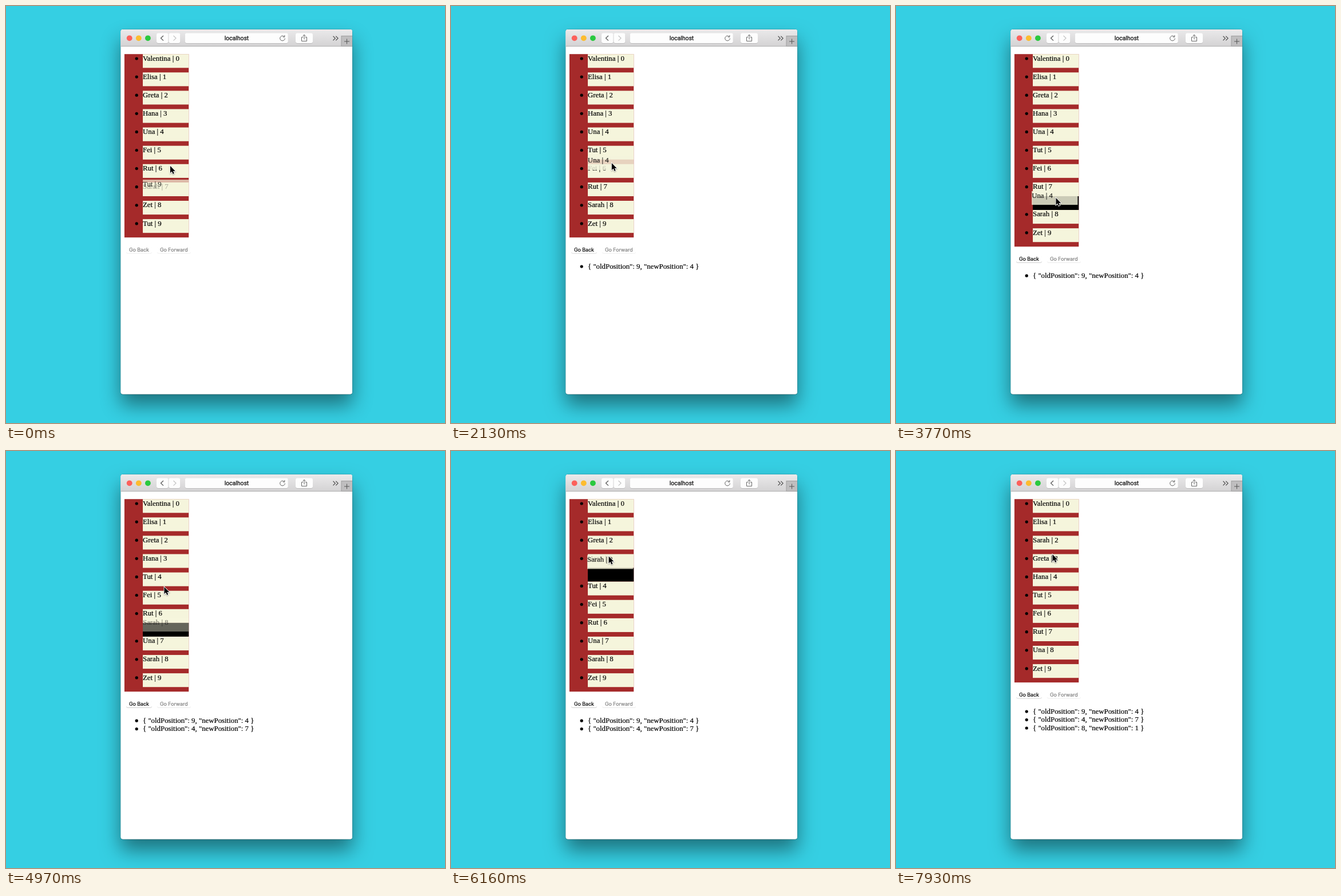
An HTML page with a canvas for the animation above (8000 ms loop, 767 by 730 pixels).

```html
<!DOCTYPE html>
<html lang="en">
<head>
<meta charset="utf-8">
<title>Sortable list</title>
<style>
  html, body { margin: 0; width: 100%; height: 100%; overflow: hidden; background: #35cfe3; }
  canvas { display: block; }
</style>
</head>
<body>
<canvas id="stage" width="767" height="730"></canvas>
<script>
const ctx = document.getElementById('stage').getContext('2d');
const LOOP = 8000, TICK = 148.9, DELAY = 32;
const ZOOM = 0.8025;
const LEFT = 206.92, TOP = 84.2, INDENT = LEFT + 40 * ZOOM;
const ROW = 40 * ZOOM, BOX = 30 * ZOOM, WIDTH = 100 * ZOOM, GROW = 20 * ZOOM;
const SERIF = `${16 * ZOOM}px "Liberation Serif", "Times New Roman", serif`;
const SMALL = `${11 * ZOOM}px Inter, sans-serif`;
const BROWN = '#a52a2a', BEIGE = '#f5f5dc';

const names = ['Valentina', 'Elisa', 'Greta', 'Hana', 'Una', 'Fei', 'Rut', 'Sarah', 'Zet', 'Tut'];

// Each drag takes row `from` to the gap below row `to`; times are in ticks.
// The pointer eases from start to end, then glides to rest during `glide`.
// The dragged copy starts `lag` pixels behind the pointer and catches up.
const drags = [
  { grab: 0, drop: 8, from: 9, to: 4, curve: 0, lag: 36,
    start: [287, 280], end: [282, 236], rest: [282, 224], glide: [8, 10] },
  { grab: 13, drop: 26, from: 4, to: 7, curve: 2.75, lag: 0,
    start: [282, 224], end: [279.5, 336], rest: [276.5, 354], glide: [28, 29] },
  { grab: 33, drop: 49, from: 8, to: 1, curve: -3.4, lag: 66,
    start: [276.5, 238], end: [275, 143], rest: [273.5, 181], glide: [50, 53] }
];

const clamp = u => Math.min(1, Math.max(0, u));
const mix = (a, b, u) => a.map((v, i) => v + (b[i] - v) * u);

// Ease-out; a positive curve overshoots, a negative one starts slowly.
function ease(u, curve) {
  const v = u - 1;
  return 1 + (curve + 1) * v ** 3 + curve * v ** 2;
}

function pointerAt(d, k) {
  if (k >= d.drop) return mix(d.end, d.rest, clamp((k - d.glide[0]) / (d.glide[1] - d.glide[0])));
  return mix(d.start, d.end, ease(clamp((k - d.grab) / (d.drop - d.grab - 2)), d.curve));
}

const lagAt = (d, k) => d.lag * 0.79 ** Math.max(0, k - d.grab);
const copyTop = (d, k) => pointerAt(d, k)[1] - 12 + lagAt(d, k);

// Hovering reacts one tick late.
function openGap(d, k) {
  const y = copyTop(d, k - 1) + 11.5 - TOP;
  const row = Math.floor(y / ROW);
  return y - row * ROW >= BOX ? row : -1;
}

function rect(x, y, w, h, fill) {
  ctx.fillStyle = fill;
  ctx.fillRect(x, y, w, h);
}

function round(x, y, w, h, r, fill) {
  ctx.fillStyle = fill;
  ctx.beginPath();
  ctx.roundRect(x, y, w, h, r);
  ctx.fill();
}

function dot(x, y, r, fill = '#000') {
  ctx.fillStyle = fill;
  ctx.beginPath();
  ctx.arc(x, y, r, 0, 7);
  ctx.fill();
}

function text(s, x, y, font = SERIF, fill = '#000') {
  ctx.font = font;
  ctx.fillStyle = ctx.strokeStyle = fill;
  ctx.lineWidth = 0.2;
  ctx.fillText(s, x, y);
  ctx.strokeText(s, x, y);
}

function line(path, color, width = 1) {
  ctx.strokeStyle = color;
  ctx.lineWidth = width;
  ctx.stroke(new Path2D(path));
}

function control(x, w) {
  round(x, 48.2, w, 17.5, 3, 'rgba(0,0,0,.16)');
  round(x, 47.5, w, 17.5, 3, '#fdfdfd');
}

function drawWindow() {
  rect(0, 0, 767, 730, '#35cfe3');
  ctx.save();
  ctx.shadowColor = 'rgba(0,0,0,.45)';
  ctx.shadowBlur = 34;
  ctx.shadowOffsetY = 19;
  round(200.5, 41, 404.5, 638.5, 4, '#fff');
  ctx.restore();
  round(200, 40.5, 405.5, 640, 4.5, 'rgba(0,0,0,.25)');
  round(200.5, 41, 404.5, 638.5, 4, '#fff');

  const bar = ctx.createLinearGradient(0, 41, 0, 71);
  bar.addColorStop(0, '#ebeaeb');
  bar.addColorStop(1, '#d3d2d3');
  round(200.5, 41, 404.5, 30, [4, 4, 0, 0], bar);
  rect(200.5, 70, 404.5, 1, '#b0afb0');
  ['#fc605b', '#fdbc2f', '#2ac93f'].forEach((c, i) => dot(215.7 + 16.1 * i, 56.3, 4.9, c));

  control(263, 20.5);
  control(284.3, 20);
  control(312.8, 180);
  control(506, 30);
  line('M275 52l-4.5 4.3 4.5 4.3', '#555', 1.2);
  line('M292.5 52l4.5 4.3-4.5 4.3', '#c4c4c4', 1.2);
  ctx.textAlign = 'center';
  text('localhost', 403, 60.2, '10.4px Roboto, sans-serif');
  ctx.textAlign = 'left';
  line('M486.3 53.8a4.3 4.3 0 1 0 1 2.7M486.8 51v3.2h-3.2', '#666');
  line('M519 54.5h-2.5v7h9v-7h-2.5M521 58.5v-8M518.6 52.6l2.4-2.4 2.4 2.4', '#666');
  line('M571.5 52.8l3.8 3.7-3.8 3.7M576.3 52.8l3.8 3.7-3.8 3.7', '#555', 1.2);
  rect(585.5, 52, 19.5, 19, '#9f9f9f');
  rect(586.5, 53, 18.5, 17, '#bfbebf');
  line('M591 62h9M595.5 57.5v9', '#555');
}

function button(label, x, y, w, on) {
  round(x, y + 0.8, w, 12, 3, `rgba(0,0,0,${on ? 0.2 : 0.09})`);
  round(x, y, w, 12, 3, '#fff');
  text(label, x + 5, y + 9.2, SMALL, on ? '#000' : '#7c7c7c');
}

function bullet(s, baseline) {
  dot(228.2, baseline - 3.6, 2.6);
  text(s, INDENT, baseline);
}

function drawCopy(label, d, k) {
  const x = INDENT - 2 * clamp((k - d.grab) / (d.drop - d.grab));
  const y = copyTop(d, k);
  ctx.globalAlpha = 0.83 - (lagAt(d, k) / 102) ** 2;
  rect(x, y, WIDTH, BOX, BEIGE);
  text(label, x, y + 11.5);
  ctx.globalAlpha = 1;
}

function drawCursor([x, y]) {
  const arrow = new Path2D('M0 0V12.2L2.8 9.6 4.7 14 6.8 13.1 4.9 8.9H8.7Z');
  ctx.save();
  ctx.translate(x, y);
  ctx.shadowColor = 'rgba(0,0,0,.35)';
  ctx.shadowBlur = 2;
  ctx.shadowOffsetY = 1;
  ctx.lineWidth = 1.7;
  ctx.strokeStyle = '#fff';
  ctx.stroke(arrow);
  ctx.shadowColor = 'transparent';
  ctx.fillStyle = '#000';
  ctx.fill(arrow);
  ctx.restore();
}

function draw(k) {
  const list = names.slice();
  const done = drags.filter(d => k >= d.drop);
  for (const { from, to } of done) {
    const [item] = list.splice(from, 1);
    list.splice(from > to ? to + 1 : to, 0, item);
  }
  const last = drags.findLast(d => k >= d.grab);
  const dragging = k < last.drop;
  const open = dragging ? openGap(last, k) : -1;
  const shift = open < 0 ? 0 : GROW;
  const label = i => `${list[i]} | ${i}`;

  drawWindow();
  rect(LEFT, TOP, 140 * ZOOM, 10 * ROW + shift, BROWN);
  list.forEach((_, i) => {
    const y = TOP + ROW * i + (i > open ? shift : 0);
    rect(INDENT, y, WIDTH, BOX, BEIGE);
    if (i === open) rect(INDENT, y + BOX, WIDTH, BOX, '#000');
    bullet(label(i), y + 11.4);
  });
  button('Go Back', 210, 420.8 + shift, 45, done.length > 0);
  button('Go Forward', 264, 420.8 + shift, 59, false);
  done.forEach(({ from, to }, i) =>
    bullet(`{ "oldPosition": ${from}, "newPosition": ${to} }`, 459.7 + shift + 18 * ZOOM * i));

  if (dragging) drawCopy(label(last.from), last, k);
  drawCursor(pointerAt(last, k));
}

let start;
function frame(now) {
  start ??= now;
  const t = (now - start) % LOOP;
  draw(Math.max(0, Math.floor((t - DELAY) / TICK)));
  requestAnimationFrame(frame);
}
requestAnimationFrame(frame);
</script>
</body>
</html>
```
